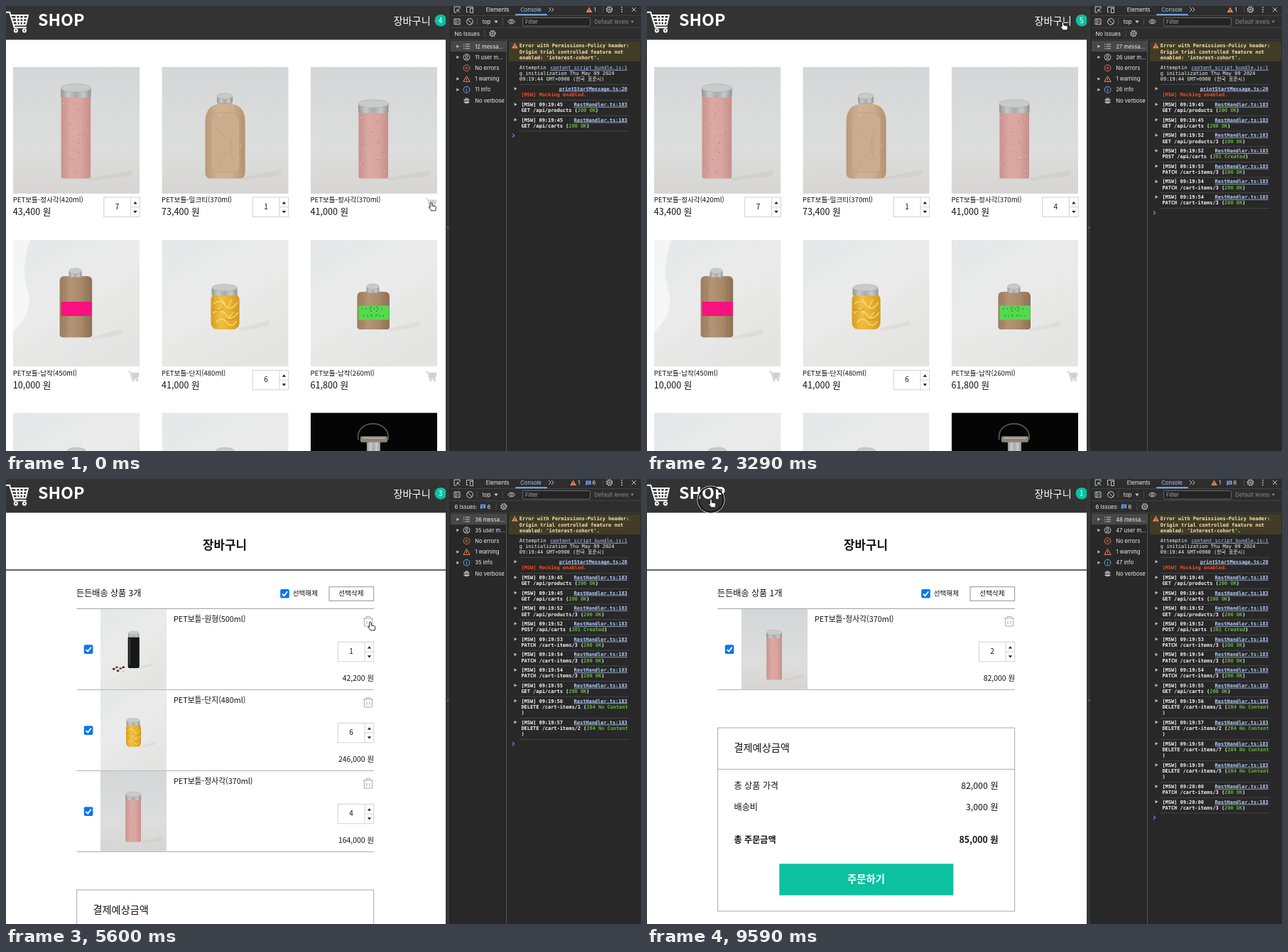
Recreate the animation shown at these times as an HTML page. Size 894 by 626 pixels, loop 9.73 s.

```html
<!DOCTYPE html>
<html lang="ko">
<head>
<meta charset="utf-8">
<title>Shop</title>
<style>
html, body { margin: 0; width: 100%; height: 100%; overflow: hidden; background: #fff; }
svg { display: block; }
text { font-family: "Noto Sans CJK KR", "Noto Sans CJK", sans-serif; fill: #111; white-space: pre; }
.ui { font: 7.6px Inter, Roboto, sans-serif; fill: #eee; }
.mono { font: 6.95px "DejaVu Sans Mono", "Noto Sans CJK KR", monospace; fill: #f4f4f4; }
.b { font-weight: 700; }
.link { text-decoration: underline; fill: #b4cdfb; }
.icon { fill: none; stroke: #c7c7c7; stroke-width: 1; }
</style>
</head>
<body>
<svg id="stage" width="894" height="626" viewBox="0 0 894 626">
<defs id="defs"></defs>
<g id="page"></g>
<g id="tools"></g>
<g id="ring" fill="none"><circle r="19" stroke="#eee" stroke-width="1"/><circle r="17.6" stroke="#111" stroke-width="1.9"/></g>
<g id="cursor">
<path id="hand" fill="#fff" stroke="#111" stroke-width=".9" stroke-linejoin="round" d="M-1.3 .8a1.3 1.3 0 0 1 2.6 0V4l4 .7q1.7 .4 1.6 2l-.7 4.2H0q-1-2.2-3-4q-.6-1.3 .6-1.5l1.1 .9Z"/>
<path id="arrow" fill="#111" stroke="#fff" stroke-width=".7" d="M0 0V9.5L2.2 7.5 3.8 11 5.3 10.3 3.8 7H7Z"/>
</g>
</svg>
<script>
const LOOP = 9730, STEP = 70, TEAL = '#0bc1a0';
const $ = id => document.getElementById(id);
const won = n => n.toLocaleString('en-US') + ' 원';

// ---------- drawing helpers ----------
const rect = (x, y, w, h, fill, more = '') => `<rect x="${x}" y="${y}" width="${w}" height="${h}" fill="${fill}" ${more}/>`;
const path = (d, more = '') => `<path d="${d}" ${more}/>`;
const line = (x1, y1, x2, y2, color, w = 1) => path(`M${x1} ${y1}L${x2} ${y2}`, `stroke="${color}" stroke-width="${w}"`);
const text = (x, y, size, s, more = '') => `<text x="${x}" y="${y}" font-size="${size}" ${more}>${s}</text>`;
const ui = (x, y, s, more = '') => `<text class="ui" x="${x}" y="${y}" ${more}>${s}</text>`;
const mono = (x, y, s, cls = '', more = '') => `<text class="mono ${cls}" x="${x}" y="${y}" ${more}>${s}</text>`;
const at = (x, y, s) => `<g transform="translate(${x} ${y})">${s}</g>`;
const END = 'text-anchor="end"', MID = 'text-anchor="middle"', BOLD = 'font-weight="700"', MEDIUM = 'font-weight="500"';

const gradient = (id, dir, ...colors) => `<linearGradient id="${id}" x1="0" y1="0" ${dir}>` +
  colors.map((c, i) => `<stop offset="${i / (colors.length - 1)}" stop-color="${c}"/>`).join('') + '</linearGradient>';

function speckles(seed, n, x, y, w, h, color) {
  let s = seed, out = '';
  const rnd = () => (s = s * 16807 % 2147483647) / 2147483647;
  for (let i = 0; i < n; i++) {
    out += `<circle cx="${(x + rnd() * w).toFixed(1)}" cy="${(y + rnd() * h).toFixed(1)}" r="${(.3 + rnd() * .6).toFixed(1)}" fill="${color}"/>`;
  }
  return out;
}

// ---------- product pictures, 178 x 178 ----------
const lid = (x, y, w, h) => rect(x, y + h * .28, w, h * .72, 'url(#steel)', 'rx="2"') +
  `<ellipse cx="${x + w / 2}" cy="${y + h * .3}" rx="${w / 2 - .3}" ry="${h * .3}" fill="#c9caca" stroke="#a9aaaa" stroke-width=".6"/>`;
const shadow = (x, y, w) => path(`M${x} ${y}l${w} -12v8l${-w + 4} 7Z`, 'fill="#8f8d89" opacity=".1"');
const photo = (id, bg, body) => `<symbol id="${id}" viewBox="0 0 178 178" preserveAspectRatio="none">${rect(0, 0, 178, 178, `url(#${bg})`)}${body}</symbol>`;

const pink = top => shadow(107, 157, 60) + rect(67.5, top, 41.5, 157 - top, 'url(#pink)', 'rx="3"') +
  speckles(41 + top, 30, 70, top + 8, 36, 145 - top, '#bd7773') + speckles(977 + top, 16, 70, top + 8, 36, 145 - top, '#ebc5c0') +
  lid(67, top - 17, 42.5, 19);
const flat = (top, bottom, label, color) => shadow(108, bottom, 45) +
  path(`M72 ${top}H104Q111 ${top} 111 ${top + 7}V${bottom - 4}Q111 ${bottom} 107 ${bottom}H70Q65.5 ${bottom} 65.5 ${bottom - 4}V${top + 7}Q65.5 ${top} 72 ${top}Z`, 'fill="url(#tan)"') +
  path(`M74 ${top + 8}V${bottom - 5}M103 ${top + 8}V${bottom - 5}`, 'stroke="#8d7056" stroke-width="1.5" opacity=".4"') +
  lid(78.5, top - 11, 18, 12.5) + rect(67.5, label, 43, 20, color, 'rx="1"');

$('defs').innerHTML =
  gradient('steel', 'x2="1" y2="0"', '#959696', '#c8c9c9', '#a9aaab', '#c8c9c9', '#929394') +
  gradient('pink', 'x2="1" y2="0"', '#c9938e', '#dba8a3', '#d9a5a0', '#c88e89') +
  gradient('tan', 'x2="1" y2="0"', '#9a7b5f', '#b59475', '#a98969', '#8f6f53') +
  gradient('milk', 'x2="1" y2="0"', '#b89878', '#d0b394', '#cdae8f', '#b4916f') +
  gradient('jar', 'x2="1" y2="0"', '#d39c22', '#efbf41', '#e8b02d', '#cf981f') +
  gradient('gray', 'x2="0" y2="1"', '#d4d7d7', '#d9dbdb', '#dcdddc', '#d6d5d3') +
  gradient('pale', 'x2=".6" y2="1"', '#e6e7e8', '#ebebeb', '#e4e4e3') +
  photo('tall', 'gray', pink(41)) +
  photo('short', 'gray', pink(63)) +
  photo('milktea', 'gray', shadow(112, 156, 56) + rect(79, 47, 19, 9, '#bfa081') +
    path('M82 52H96Q117 53 117 78V149Q117 157 109 157H69Q61 157 61 149V78Q61 53 82 52Z', 'fill="url(#milk)"') +
    path('M69 80q0-16 13-16h14q13 0 13 16v60q0 8-8 8H77q-8 0-8-8Z', 'fill="#cbac8c" stroke="#bd9e7e" stroke-width=".7"') +
    path('M76 86l24 24-22 28M102 86q-12 22 0 48', 'fill="none" stroke="#bd9e7e" stroke-width=".8"') +
    speckles(77, 10, 66, 66, 46, 84, '#dcc6ac') + lid(77.5, 37, 22, 14)) +
  photo('flat450', 'pale', path('M0 0h24q-14 40-4 70t-20 60Z', 'fill="#fff" opacity=".6"') + flat(51, 137, 87, '#f8117f')) +
  photo('flat260', 'pale', flat(73, 126, 92.5, '#55d94f') +
    path('M72 97h32M74 107h30M85 94v16M93 94v16', 'stroke="#1d5c1c" stroke-width="1" stroke-dasharray="1.5 4" fill="none"')) +
  photo('jarred', 'pale', shadow(106, 125, 45) + rect(69, 75, 40, 51, 'url(#jar)', 'rx="9"') +
    path('M73 90q8-8 16 2t17-4M72 103q10-9 18 2t17-3M76 116q8-9 15 0t14-2M82 82l8 9M98 84l-5 12M79 96l7 8M100 102l-7 9', 'fill="none" stroke="#f6d570" stroke-width="1.6"') +
    path('M71 97q8 5 15 0M90 111q6 5 14-3', 'fill="none" stroke="#cf961c" stroke-width="1.1"') + lid(70, 62.5, 36, 16)) +
  photo('black', 'pale', shadow(102, 130, 40) + rect(74, 61, 31, 70, '#17181a', 'rx="4"') + rect(78, 66, 2.5, 58, '#45474a') + lid(75, 49, 29, 14) +
    speckles(19, 8, 34, 128, 32, 11, '#3a2419') + [[36, 133], [44, 129], [47, 137], [54, 132], [62, 129]].map(([x, y], i) =>
      `<ellipse cx="${x}" cy="${y}" rx="3.5" ry="2" fill="${i % 2 ? '#6d3f2a' : '#2b1d17'}"/>`).join('')) +
  photo('capped', 'pale', lid(76, 49, 26, 14)) +
  photo('flask', 'pale', rect(0, 0, 178, 178, '#050505') +
    path('M67 38C62 8 113 8 109 38', 'fill="none" stroke="#5c564e" stroke-width="1.7"') +
    rect(79, 38, 19, 140, 'url(#steel)') + rect(70, 33, 38, 8.5, '#8b8478', 'rx="2"') + rect(73, 34.5, 32, 2, '#b7b1a6', 'rx="1"'));

const image = (id, x, y, w, h) => `<use href="#${id}" x="${x}" y="${y}" width="${w}" height="${h}"/>`;

// ---------- shop page ----------
const cartShape = 'M0 .8h2.7l3.2 10.4h8.2M3.3 2.9h11.8l-1.5 6.5H5.4M4 5h10.6M4.6 7.2h9.5M7 2.9l.9 6.5M9.5 2.9l.2 6.5M12.2 2.9l-.6 6.5';
const cart = (x, y, scale, color, w) => `<g transform="translate(${x} ${y}) scale(${scale})" fill="none" stroke="${color}" stroke-width="${w}">` +
  path(cartShape) + '<circle cx="6.9" cy="13.2" r="1"/><circle cx="12.7" cy="13.2" r="1"/></g>';

const tri = (x, y, d) => path(`M${x - 2.7} ${y + 1.7 * d}h5.4l-2.7 ${-3.4 * d}Z`, 'fill="#222"');
const counter = (x, y, n) => rect(x, y, 50.5, 27.5, '#fff', 'stroke="#ccc" stroke-width=".9"') +
  line(x + 37.8, y, x + 37.8, y + 27.5, '#ccc', .9) + line(x + 37.8, y + 13.8, x + 50.5, y + 13.8, '#ccc', .9) +
  text(x + 18.8, y + 16.6, 10, n, MID + MEDIUM) + tri(x + 44.2, y + 7.6, 1) + tri(x + 44.2, y + 20.6, -1);

const trash = (x, y) => at(x, y, path('M-7 -4.3H7M-3 -4.3V-6.7H3V-4.3M-5.6 -4.3V6.7H5.6V-4.3M-2 -.8V3.6M2 -.8V3.6', 'fill="none" stroke="#aaa" stroke-width="1"'));
const check = (x, y) => at(x, y, rect(0, 0, 12.6, 12.6, '#0a75f0', 'rx="2"') + path('M2.8 6.6l2.6 2.7 4.6-6', 'fill="none" stroke="#fff" stroke-width="1.8"'));

const GOODS = [
  ['tall', '정사각(420ml)', 43400], ['milktea', '밀크티(370ml)', 73400], ['short', '정사각(370ml)', 41000],
  ['flat450', '납작(450ml)', 10000], ['jarred', '단지(480ml)', 41000], ['flat260', '납작(260ml)', 61800],
  ['capped', '', 0], ['capped', '', 0], ['flask', '', 0]
];
const CART = [['tall', '정사각(420ml)', 43400, 7], ['milktea', '밀크티(370ml)', 73400, 1], ['black', '원형(500ml)', 42200, 1],
  ['jarred', '단지(480ml)', 41000, 6], ['short', '정사각(370ml)', 41000, 4]];

const header = n => rect(0, 0, 619, 47.5, '#333') + cart(-.5, 7, 2.08, '#fff', .95) +
  text(45, 28, 23.2, 'SHOP', BOLD + ' style="fill:#fff"') + text(545.5, 26, 14.2, '장바구니', MEDIUM + ' style="fill:#fff"') +
  `<circle cx="612" cy="20.3" r="8.4" fill="${TEAL}"/>` + text(611.6, 24, 10.4, n, MID + MEDIUM + ' style="fill:#fff"');

function shopPage(qty) {
  const counts = [7, 1, qty, 0, 6, 0];
  return GOODS.map(([pic, name, price], i) => {
    const x = 10 + 209.4 * (i % 3), y = 85.6 + 243.3 * Math.floor(i / 3);
    const control = counts[i] ? counter(x + 127.8, y + 183.5, counts[i]) : cart(x + 162, y + 184.6, 1, '#999', .6);
    return image(pic, x, y, 178.3, 178.3) + (name && text(x - .3, y + 190.8, 9.6, 'PET보틀-' + name, MEDIUM) +
      text(x - .3, y + 208.7, 12.6, won(price)) + control);
  }).join('');
}

function cartPage(gone, qty) {
  const items = CART.slice(gone).map(r => r[0] === 'short' ? [...r.slice(0, 3), qty] : r);
  const n = items.length, sum = items.reduce((s, r) => s + r[2] * r[3], 0);
  const bottom = 182.3 + 114 * n, top = bottom + 53.7;
  const row = (y, label, value, more = '') => text(122.5, top + y, 12.1, label, more) + text(494.5, top + y, 12.3, won(value), END + ' ' + more);
  return text(308, 99, 16.8, '장바구니', MID + BOLD) + line(0, 128, 619, 128, '#333', 1.5) +
    text(99, 164.8, 12.1, `든든배송 상품 ${n}개`) + check(386.2, 155) + text(403.7, 164, 9.6, '선택해제') +
    rect(455, 151.7, 62.7, 19.6, '#fff', 'stroke="#888" stroke-width=".9"') + text(486, 164.2, 9.6, '선택삭제', MID + MEDIUM) +
    line(99.5, 182.3, 518, 182.3, '#999') +
    items.map(([pic, name, price, q], i) => at(0, 114 * i,
      image(pic, 133, 182.8, 93, 113) + line(99.5, 296.3, 518, 296.3, '#aaa') + check(109.8, 233.3) +
      text(236, 201, 10.8, 'PET보틀-' + name, MEDIUM) + trash(510, 200.3) +
      counter(467.3, 229.3, q) + text(518, 284.3, 10.4, won(price * q), END))).join('') +
    rect(99.7, top, 418, 258, '#fff', 'stroke="#aaa"') + line(99.7, top + 58.3, 517.7, top + 58.3, '#aaa') +
    text(122.5, top + 33.3, 14.2, '결제예상금액') + row(86, '총 상품 가격', sum) + row(116.2, '배송비', 3000) +
    row(162, '총 주문금액', sum + 3000, BOLD) +
    rect(186.3, top + 191.3, 245, 44.3, TEAL) + text(308.5, top + 217.5, 14.4, '주문하기', MID + BOLD + ' style="fill:#fff"');
}

// ---------- console panel ----------
const LOGS = [
  ['45', 'GET /api/products', '200 OK'], ['45', 'GET /api/carts', '200 OK'], ['52', 'GET /api/products/3', '200 OK'],
  ['52', 'POST /api/carts', '201 Created'], ['53', 'PATCH /cart-items/3', '200 OK'], ['54', 'PATCH /cart-items/3', '200 OK'],
  ['54', 'PATCH /cart-items/3', '200 OK'], ['55', 'GET /api/carts', '200 OK'], ['56', 'DELETE /cart-items/1', '204 No Content'],
  ['57', 'DELETE /cart-items/2', '204 No Content'], ['58', 'DELETE /cart-items/7', '204 No Content'],
  ['59', 'DELETE /cart-items/5', '204 No Content'], ['60', 'PATCH /cart-items/3', '200 OK'], ['60', 'PATCH /cart-items/3', '200 OK']
];
const clock = s => s === '60' ? '09:20:00' : '09:19:' + s;
const caret = (x, y) => path(`M${x} ${y - 2.3}v4.6l4-2.3Z`, 'fill="#bbb"');
const rule = y => line(723, y, 877, y, '#4a4b4e', .8);
const warn = (x, y) => at(x, y, path('M0 -3.9L4.3 3.5H-4.3Z', 'fill="#f28b54"') + path('M0 -1.3V1.3M0 2v.8', 'stroke="#282828" stroke-width=".9"'));
const gear = (x, y) => at(x, y, '<circle r="3.4" class="icon" stroke-width="1.2"/><circle r="4.2" class="icon" style="stroke-width:1.2;stroke-dasharray:1.6 1.7"/><circle r="1.2" class="icon"/>');
const bubble = (x, y) => at(x, y, path('M-3.6 -3H3.6V2.2H-1.6L-3.6 4Z', 'fill="#6ea3f7"') + path('M-2 -1.3H2M-2 .6H2', 'stroke="#282828" stroke-width=".7"'));
const icon = (x, y, d, color = '#c7c7c7') => at(x, y, path(d, `class="icon" style="stroke:${color}"`));
const ROUND = 'M-4.4 0a4.4 4.4 0 1 0 8.8 0a4.4 4.4 0 1 0 -8.8 0';

function panel(count, issues) {
  const msgs = 6 + 3 * count;
  let s = rect(619, 0, 275, 626, '#282828') + rect(619, 0, 6, 626, '#353638') + line(625.3, 0, 625.3, 626, '#1c1c1c', .8) +
    '<circle cx="622" cy="311.5" r="1.8" fill="#555"/>' + rect(625.5, 0, 268.5, 47.5, '#2d2d2d');
  for (const y of [13.5, 30.5, 47.8]) s += line(625.5, y, 894, y, '#47484a', .8);
  // tab bar
  s += icon(635, 5, 'M4 -1V-4H-4V4H-1M0 0L4 4M0 0v3.4M0 0h3.4') + icon(653, 5, 'M-2.5 3.5H-4.5V-3.5H4.5V-2M.5 -1.5H4.5V4.5H.5Z') +
    ui(675.8, 7.8, 'Elements') + ui(724.3, 7.8, 'Console', MEDIUM + ' style="fill:#a8c7fa"') + rect(717, 11.3, 45, 2, '#7cacf8', 'rx="1"') +
    icon(768, 5, 'M-4 -3L-1 0L-4 3M0 -3L3 0L0 3') + gear(849.5, 5) + icon(884, 5, 'M-3 -3L3 3M3 -3L-3 3') +
    [1.8, 5, 8.2].map(y => `<circle cx="867" cy="${y}" r=".9" fill="#ccc"/>`).join('');
  s += issues ? warn(798.5, 5.5) + ui(805, 8, '1') + bubble(820, 5.5) + ui(825.5, 8, '6') : warn(821, 5.5) + ui(827.5, 8, '1');
  s += line(840.5, 1, 840.5, 10, '#555', .8);
  // filter bar
  s += icon(635, 22, 'M-4 -3.8H4V3.8H-4ZM-1.5 -3.8V3.8M2.5 -2L.3 0L2.5 2') + icon(653, 22, ROUND + 'M-3 -3L3 3') +
    line(663.5, 17, 663.5, 27, '#555', .8) + ui(670.8, 24.8, 'top') + path('M687.3 20.6h5.4l-2.7 3.6Z', 'fill="#c7c7c7"') +
    line(699.5, 17, 699.5, 27, '#555', .8) + icon(711.5, 22, 'M-5 0Q0 -6 5 0Q0 6 -5 0M-1.5 0a1.5 1.5 0 1 0 3 0a1.5 1.5 0 1 0 -3 0') +
    rect(727.5, 16.5, 95, 11.8, '#242424', 'rx="2" stroke="#777" stroke-width=".8"') + ui(731, 25, 'Filter', 'style="fill:#aaa"') +
    ui(828.3, 25, 'Default levels', 'style="fill:#8e8e8e"') + path('M879.5 20.8h4.4l-2.2 3Z', 'fill="#8e8e8e"');
  s += issues ? ui(631.5, 41.6, '6 Issues:') + bubble(671.5, 38.8) + ui(677.5, 41.6, '6') + line(690, 34, 690, 44, '#555', .8) + gear(700.7, 38.8)
    : ui(631.5, 41.6, 'No Issues') + line(674, 34, 674, 44, '#555', .8) + gear(685, 38.8);
  // sidebar
  s += rect(625.8, 49, 78.5, 15.2, '#474747') + line(704.6, 48, 704.6, 626, '#5a5b5d', .9);
  [`${msgs} messa...`, `${msgs - 1} user m...`, 'No errors', '1 warning', `${msgs - 1} info`, 'No verbose'].forEach((label, i) => {
    const y = 56.8 + 15.22 * i;
    s += ui(660.2, y + 2.8, label) + (i === 2 || i === 5 ? '' : caret(634.3, y));
  });
  s += icon(648.5, 56.8, 'M-2 -3H4.5M-2 0H4.5M-2 3H4.5M-4.5 -3h1.2M-4.5 0h1.2M-4.5 3h1.2') +
    icon(648.5, 72, ROUND + 'M-1.6 -1.2a1.6 1.6 0 1 0 3.2 0a1.6 1.6 0 1 0 -3.2 0M-3 3Q0 .5 3 3') +
    icon(648.5, 87.2, ROUND + 'M-1.8 -1.8L1.8 1.8M1.8 -1.8L-1.8 1.8', '#e46962') +
    icon(648.5, 102.5, 'M0 -4L4.6 3.8H-4.6ZM0 -1V1.3M0 2v.8', '#f28b54') +
    icon(648.5, 117.7, ROUND + 'M0 -.8V2.5M0 -2.4v.9', '#6ea3f7') +
    icon(648.5, 132.9, 'M-2.2 -2H2.2V3.6H-2.2ZM-4.3 -1H4.3M-4.3 2.4H4.3M-1.6 -4L0 -2L1.6 -4M-1 0H1M-1 1.8H1');
  // fixed messages
  s += rect(707.8, 49.5, 185.4, 28.5, '#413c26', 'rx="3"') + warn(716.3, 56);
  ['Error with Permissions-Policy header:', 'Origin trial controlled feature not', "enabled: 'interest-cohort'."].forEach((m, i) =>
    s += mono(722.8, 58.4 + 8.3 * i, m, 'b', 'style="fill:#f6e6b4"'));
  s += mono(722.8, 88.9, 'Attemptin') + mono(874.8, 88.9, 'content_script_bundle.js:1', 'link', END) +
    mono(722.8, 97, 'g initialization Thu May 09 2024') + mono(722.8, 105.2, '09:19:44 GMT+0900 (한국 표준시)') +
    rule(110.3) + caret(715.5, 116.3) + mono(874.8, 118.6, 'printStartMessage.ts:20', 'link b', END) +
    mono(725.4, 126.9, '[MSW] Mocking enabled.', 'b', 'style="fill:#ff4a16"');
  // request log
  let y = 138.4;
  for (const [sec, req, status] of LOGS.slice(0, count)) {
    const long = status.length > 12;
    s += rule(y - 5.8) + caret(715.5, y) + mono(725.4, y + 2.5, `[MSW] ${clock(sec)}`, 'b') +
      mono(874.8, y + 2.5, 'RestHandler.ts:183', 'link b', END) +
      mono(725.4, y + 10.8, `${req} (<tspan fill="#68b53c">${status}</tspan>${long ? '' : ')'}`, 'b') +
      (long ? mono(725.4, y + 19, ')', 'b') : '');
    y += long ? 30.1 : 21.7;
  }
  s += rule(y - 5.8);
  return s + path(`M713 ${y - 2.2}l2.6 2.6-2.6 2.6`, 'fill="none" stroke="#5b93f5" stroke-width="1.2"');
}

// ---------- timeline ----------
const passed = (t, ...times) => times.filter(x => t >= x).length;
const CLICKS = [210, 1190, 1750, 2450, 3430, 4690, 5390, 6090, 7350, 8050, 8680, 9590];
const ROUTE = [
  [0, 598.5, 277], [770, 598.5, 277], [840, 599, 277.4], [2660, 599.3, 278], [3290, 585.5, 23], [3640, 585.5, 23], [4200, 508, 212],
  [4270, 508, 212], [4550, 513, 202], [6930, 513, 202], [7070, 513, 199], [7560, 513, 199], [7910, 512, 259],
  [8050, 511, 249], [8890, 511, 249], [9520, 90, 29], [LOOP, 90, 29]
];
const ARROW = [[2730, 3220], [3710, 4130], [7630, 7980], [8960, 9450]];

function pointer(t) {
  const i = ROUTE.findIndex(k => k[0] > t), [t0, x0, y0] = ROUTE[i - 1], [t1, x1, y1] = ROUTE[i];
  const u = (t - t0) / (t1 - t0), e = u * u * (3 - 2 * u);
  return [x0 + (x1 - x0) * e, y0 + (y1 - y0) * e];
}

const shown = {};
function put(id, key, build) {
  if (shown[id] === key) return;
  shown[id] = key;
  $(id).innerHTML = build();
}

function draw(time) {
  const t = Math.floor(time / STEP) * STEP;
  const inCart = t >= 3500;
  const gone = passed(t, 4830, 5530, 6230, 7490);
  const qty = passed(t, 490, 1330, 1890, 2590) - passed(t, 8190, 8820);
  const count = 2 + passed(t, 420, 490, 1330, 1890, 2590, 3780, 4760, 5530, 6230, 7490, 8190, 8820);
  const badge = 4 + passed(t, 490) - gone;
  put('page', [inCart, gone, qty, badge].join(), () => rect(0, 0, 619, 626, '#fff') + (inCart ? cartPage(gone, qty) : shopPage(qty)) + header(badge));
  put('tools', [count, t >= 3780].join(), () => panel(count, t >= 3780));

  const move = `translate(${pointer(t).join(' ')})`;
  const arrow = ARROW.some(([a, b]) => t >= a && t <= b);
  $('cursor').setAttribute('transform', move);
  $('ring').setAttribute('transform', move);
  $('ring').style.display = CLICKS.some(c => t >= c && t < c + 140) ? '' : 'none';
  $('arrow').style.display = arrow ? '' : 'none';
  $('hand').style.display = arrow ? 'none' : '';
}

const start = performance.now();
function tick() {
  draw((performance.now() - start) % LOOP);
  requestAnimationFrame(tick);
}
tick();
</script>
</body>
</html>
```
